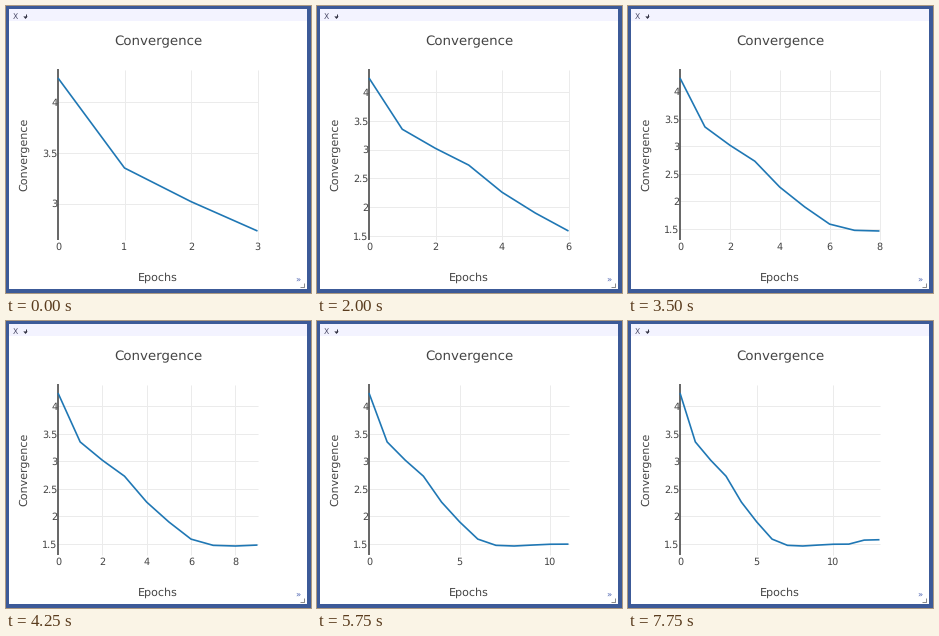
A matplotlib script that plays this animation: 305 px wide and 287 px high, repeating every 8000 ms.

```python
import matplotlib.pyplot as plt
import numpy as np
from matplotlib.animation import FuncAnimation
from matplotlib.patches import Polygon, Rectangle

plt.rcParams["font.family"] = "DejaVu Sans"
plt.rcParams["text.hinting"] = "none"

W, H, DPI = 305, 287, 100
STEP = 250                      # ms per frame
FRAMES = 32
LEFT, RIGHT, TOP, BOTTOM = 52, 251.5, 63.5, 233.5
INK, GRID, BLUE = "#444444", "#ebebeb", "#1f77b4"

LOSS = np.array([4.24, 3.352, 3.02, 2.73, 2.26, 1.90, 1.588, 1.475,
                 1.463, 1.48, 1.495, 1.497, 1.57, 1.577])
FIRST = 3                       # last epoch shown at the start
ARRIVALS = [750, 1250, 2000, 2750, 3500, 4250, 5000, 5750, 6750, 7750]

fig = plt.figure(figsize=(W / DPI, H / DPI), dpi=DPI, facecolor="white")
ax = fig.add_axes([0, 0, 1, 1])
ax.set_xlim(0, W)
ax.set_ylim(H, 0)
ax.axis("off")


def px(n):
    """Pixels to points."""
    return n * 72 / DPI


def rect(x0, y0, x1, y1, color):
    ax.add_patch(Rectangle((x0, y0), x1 - x0, y1 - y0, fc=color, lw=0))


def stroke(xs, ys, color, width, z):
    return ax.plot(xs, ys, color=color, lw=px(width), zorder=z,
                   solid_capstyle="butt", solid_joinstyle="round")[0]


def label(x, y, s, size, color=INK, ha="center", va="baseline", **kw):
    return ax.text(x, y, s, fontsize=px(size), color=color,
                   ha=ha, va=va, zorder=6, **kw)


def draw_window():
    rect(0, 0, W, H, "#3c5a98")
    rect(3, 3, 301, 283, "white")
    rect(3, 3, 301, 15, "#f3f3ff")
    label(9.4, 12.6, "X", 7.6, "#4a4a68")
    stroke([19.5, 19.5], [7.6, 11], "#333344", 1, 5)
    ax.add_patch(Polygon([(17.3, 10.4), (21.7, 10.4), (19.5, 13)],
                         fc="#333344", lw=0, zorder=5))
    label(291.8, 275.3, "»", 8.5, "#4a62b0")
    stroke([294, 297.5, 297.5], [280.5, 280.5, 277], "#8c8c8c", 1, 5)


def draw_titles():
    label(152, 38.9, "Convergence", 13.35)
    label(152, 275, "Epochs", 11.1)
    label(21.4, 148.5, "Convergence", 11.1, rotation=90,
          rotation_mode="anchor")


def x_step(last):
    """Smallest of 1, 2, 5 that lies above a fifth of the range."""
    return next(s for s in (1, 2, 5) if s > last / 5)


draw_window()
draw_titles()
stroke([LEFT, LEFT], [TOP - 0.5, BOTTOM], INK, 1.6, 3)
curve = stroke([], [], BLUE, 1.65, 4)
ticks = []


def update(i):
    while ticks:
        ticks.pop().remove()
    last = FIRST + sum(i * STEP >= t for t in ARRIVALS)
    data = LOSS[:last + 1]
    span = np.ptp(data) / 0.9
    low = data.min() - 0.05 * span
    high = low + span

    def to_x(v):
        return LEFT + (RIGHT - LEFT) * v / last

    def to_y(v):
        return TOP + (BOTTOM - TOP) * (high - v) / span

    for v in range(0, last + 1, x_step(last)):
        x = to_x(v)
        if v:
            ticks.append(stroke([x, x], [TOP, BOTTOM], GRID, 1, 2))
        ticks.append(label(x, 244, str(v), 9.7))
    for v in np.arange(np.ceil(low * 2) / 2, high, 0.5):
        y = to_y(v)
        ticks.append(stroke([LEFT, RIGHT], [y, y], GRID, 1, 2))
        ticks.append(label(51.3, y + 3.7, f"{v:g}", 9.7, ha="right"))

    curve.set_data(to_x(np.arange(last + 1)), to_y(data))
    return [curve, *ticks]


anim = FuncAnimation(fig, update, frames=FRAMES, interval=STEP,
                     init_func=lambda: update(0), repeat=True,
                     repeat_delay=0, blit=False)
plt.show()
```
